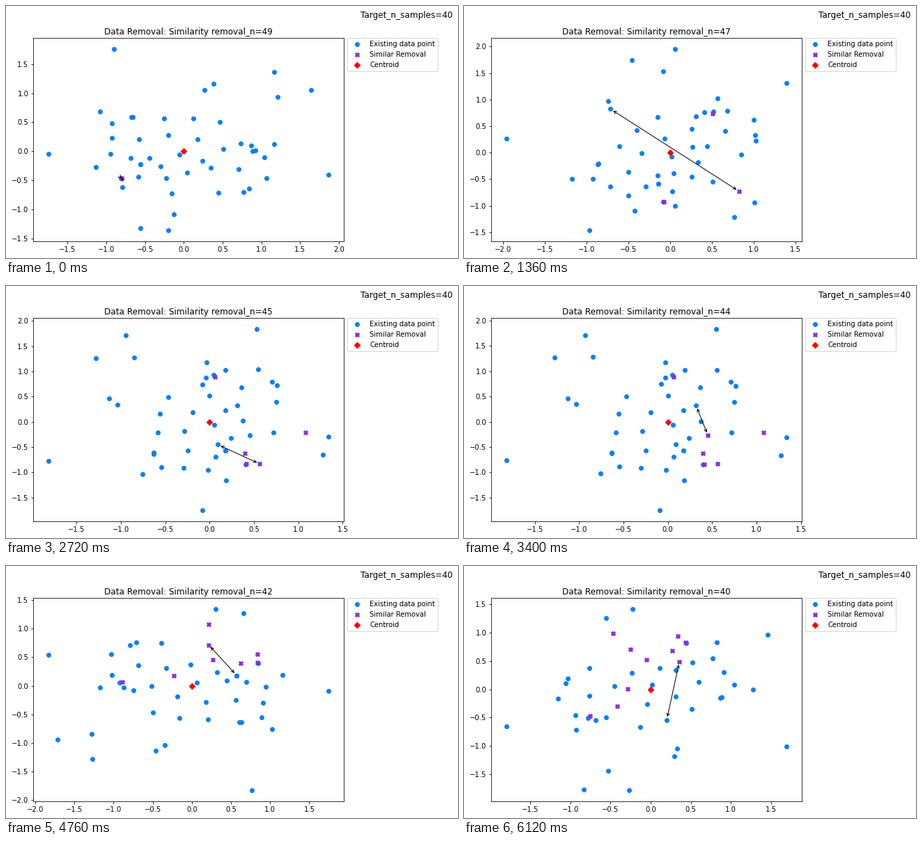
A matplotlib script for the animation above (6.8 s loop, 649 px wide and 363 px high).

```python
import numpy as np
import matplotlib.pyplot as plt
from matplotlib.animation import FuncAnimation
from matplotlib.ticker import MultipleLocator

W, H, DPI = 649, 363, 72
STEPS, STEP_MS = 10, 680
BLUE, VIOLET, RED = "#0080ff", "blueviolet", "red"
ANGLES = [0, -31.9, 55.3, 122.1, 86, 85.6, 118, 175.7, 193, 212]

plt.rcParams["font.family"] = "DejaVu Sans"
rng = np.random.default_rng(4)

# Each step removes the first point of a pair; the arrow leads to the second.
PAIRS = np.array([
    (-.803 - .470j, -.81 - .46j), (.89, .45 - .72j),
    (-.13 - 1.09j, .27 + 1.06j), (-.59 - .44j, -.69 - .12j),
    (-.79 - .62j, -.44 - .12j), (-.23 - .47j, .35 - .29j),
    (.24 - .16j, -.30 - .26j), (-.16 - .73j, -.56 - .22j),
    (.51 + .04j, .71 - .31j), (-.56 - .22j, .12 + .57j)])

# Outer points, which set the axis limits.
RIM = [-.90 + 1.76j, 1.17 + 1.37j, 1.64 + 1.06j, -1.75 - .04j,
       1.87 - .40j, -.56 - 1.32j, -.20 - 1.36j, 1.21 + .94j,
       -1.08 + .68j, -1.14 - .27j, 1.07 - .47j, .38 + 1.16j]


def clump(center, count, spread):
    return center + spread * (rng.normal(size=count)
                              + 1j * rng.normal(size=count))


def fill_gaps(points, count):
    """Add points one by one where the middle of the cloud is emptiest."""
    for _ in range(count):
        spots = rng.uniform(-.95, .55, 300) + 1j * rng.uniform(-.45, .6, 300)
        gaps = np.abs(spots[:, None] - points).min(axis=1)
        points = np.append(points, spots[gaps.argmax()])
    return points


CLOUD = np.concatenate([PAIRS.ravel(), RIM,
                        clump(.95 + .10j, 5, .13),
                        clump(-.68 + .58j, 2, .015),
                        clump(.80 - .67j, 2, .02)])
CLOUD = fill_gaps(CLOUD, 10)


def limits(values, margin):
    lo, hi = values.min(), values.max()
    pad = (hi - lo) * margin
    return lo - pad, hi + pad


fig = plt.figure(figsize=(W / DPI, H / DPI), dpi=DPI, facecolor="white")
ax = fig.add_axes([39.3 / W, 24.5 / H, 445.4 / W, 292.1 / H])
fig.text(575.5 / W, 355.8 / H, "Target_n_samples=40", size=12,
         ha="center", va="top")


def draw(step):
    ax.clear()
    turn = np.exp(1j * np.radians(ANGLES[step]))
    gone = PAIRS[:step + 1, 0]
    kept = CLOUD[~np.isin(CLOUD, gone)] * turn
    out = gone * turn
    everything = CLOUD * turn

    ax.scatter(kept.real, kept.imag, s=36, color=BLUE,
               label="Existing data point")
    ax.scatter(out.real, out.imag, s=36, color=VIOLET, marker="X",
               label="Similar Removal")
    ax.scatter([0], [0], s=36, color=RED, marker="D", label="Centroid")

    tip, tail = PAIRS[step] * turn
    ax.annotate("", xy=(tip.real, tip.imag), xytext=(tail.real, tail.imag),
                arrowprops=dict(arrowstyle="<->", mutation_scale=10,
                                shrinkA=5, shrinkB=4, lw=1, color="black"))

    ax.set_xlim(limits(everything.real, .053))
    ax.set_ylim(limits(everything.imag, .06))
    ax.xaxis.set_major_locator(MultipleLocator(.5))
    ax.yaxis.set_major_locator(MultipleLocator(.5))
    ax.set_title(f"Data Removal: Similarity removal_n={49 - step}",
                 size=12, pad=5)
    ax.legend(bbox_to_anchor=(1.0125, 1), loc="upper left",
              borderaxespad=0, scatteryoffsets=[.55])
    return []


anim = FuncAnimation(fig, draw, frames=STEPS, init_func=lambda: draw(0),
                     interval=STEP_MS, repeat=True, repeat_delay=0)
plt.show()
```
